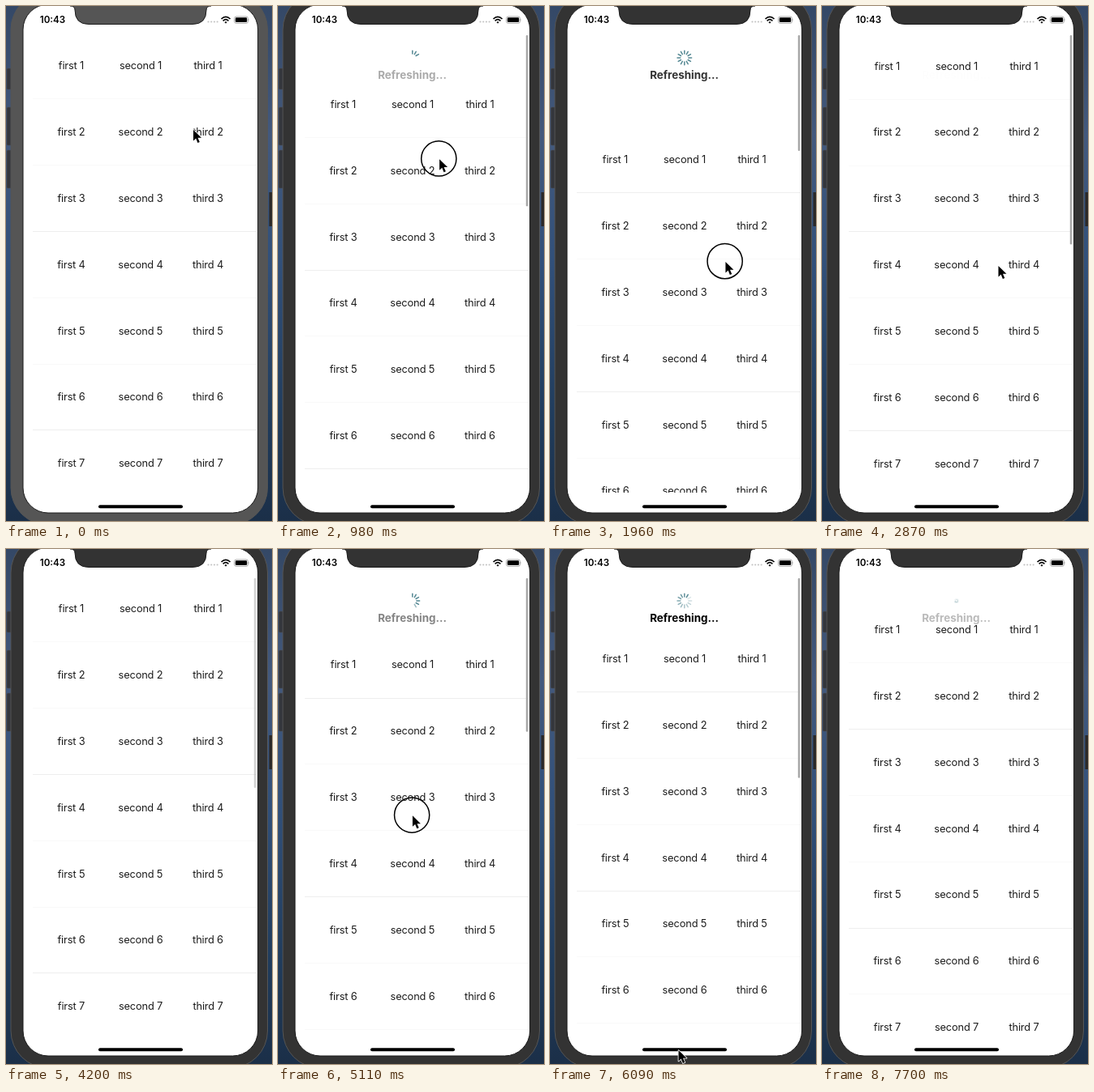
These frames come from a looping animation (328 by 636 pixels, 7770 ms). An HTML page:

```html
<!DOCTYPE html>
<html lang="en">
<head>
<meta charset="utf-8">
<title>Pull to refresh</title>
<style>
  html, body { margin: 0; width: 100%; height: 100%; overflow: hidden; background: #24405f; }
  svg { display: block; width: 328px; height: 636px; }
  text { font-family: Inter, "Liberation Sans", sans-serif; text-anchor: middle; }
  .cell { font-size: 12.8px; letter-spacing: -0.15px; fill: #1c1c1c; }
</style>
</head>
<body>
<svg viewBox="0 0 328 636">
  <defs>
    <linearGradient id="sea" x2="0" y2="1">
      <stop offset="0" stop-color="#344866"/>
      <stop offset=".25" stop-color="#43597d"/>
      <stop offset=".5" stop-color="#31507a"/>
      <stop offset=".8" stop-color="#203c5c"/>
      <stop offset="1" stop-color="#1b2f48"/>
    </linearGradient>
    <clipPath id="view"><rect x="21" y="24" width="290" height="577"/></clipPath>
  </defs>
  <rect width="328" height="636" fill="url(#sea)"/>
  <rect x="324.5" y="230" width="4" height="42" fill="#2b2928"/>
  <g fill="#34363c" stroke="#4b4e55" stroke-width=".6">
    <rect x="1" y="77" width="7" height="26" rx="1.5"/>
    <rect x="1" y="125" width="7" height="47" rx="1.5"/>
    <rect x="1" y="178" width="7" height="47" rx="1.5"/>
  </g>
  <rect id="bezel" x="6" y="-17" width="316.5" height="658" rx="46" stroke="#555"/>
  <rect x="21" y="-2" width="289.6" height="628" rx="31" fill="#fff" stroke="#1a1a1a"/>

  <g id="spinner" stroke="#568994" stroke-width="1.5" stroke-linecap="round"></g>
  <text id="label" x="165.5" y="89.5" font-size="13.4" font-weight="700">Refreshing...</text>
  <g clip-path="url(#view)"><g id="list"></g></g>
  <line id="bar" x1="307" x2="307" y1="37.2" stroke="#a9a9a9" stroke-width="2.4" stroke-linecap="round"/>

  <path id="notch" d="M79-3V0Q85 0 85 5Q85 22.5 102 22.5H230Q247 22.5 247 5Q247 0 253 0V-3Z" stroke="#1a1a1a"/>
  <text x="57.5" y="21" font-size="11.6" font-weight="600">10:43</text>
  <g id="signal" fill="#c4c4c4"></g>
  <g fill="none" stroke="#000" stroke-width="1.7">
    <path d="M265.5 16Q271 10.8 276.5 16M267.6 18.3Q271 15.1 274.4 18.3"/>
    <path d="M271 21.3l-1.2-1.3q1.2-1 2.4 0z" fill="#000" stroke-width=".6"/>
  </g>
  <rect x="281.5" y="13" width="17" height="8.4" rx="2.5" fill="none" stroke="#999" stroke-width=".8"/>
  <rect x="282.8" y="14.3" width="14.4" height="5.8" rx="1.4"/>
  <path d="M299.5 15.8q1.3 1.3 0 2.8z" fill="#999"/>
  <rect x="114" y="616.2" width="104" height="4" rx="2"/>

  <g id="pointer">
    <circle id="ring" cx="-.8" cy="-.8" r="21.6" fill="none" stroke="#000" stroke-width="1.5"/>
    <path d="M0 0V13.5L3.2 10.6 5.4 16 7.8 15 5.5 9.8H10Z" stroke="#fff" stroke-width="1.6" stroke-linejoin="round" paint-order="stroke"/>
  </g>
</svg>
<script>
const LOOP = 7770, STEP = 70, PITCH = 81.83, REST = 61.5;
const NS = "http://www.w3.org/2000/svg";
const $ = id => document.getElementById(id);

function add(parent, tag, attrs, text = "") {
  const el = document.createElementNS(NS, tag);
  for (const k in attrs) el.setAttribute(k, attrs[k]);
  el.textContent = text;
  return parent.appendChild(el);
}
const set = (id, name, value) => $(id).setAttribute(name, value);
const clamp = x => Math.max(0, Math.min(1, x));
const mod = (x, n) => ((x % n) + n) % n;
const easeIn = p => p * p;
const easeOut = p => 1 - (1 - p) * (1 - p);

const lines = [];
for (let i = 0; i < 8; i++) {
  const y = 78.2 + i * PITCH;
  ["first", "second", "third"].forEach((word, c) =>
    add($("list"), "text", { class: "cell", x: [80.5, 166, 249][c], y }, `${word} ${i + 1}`));
  if (i) lines.push(add($("list"), "line", { x1: 33, x2: 309, stroke: "#eee" }));
}
const spokes = Array.from({ length: 12 }, (_, i) =>
  add($("spinner"), "line", { y1: -5, y2: -8.8, transform: `rotate(${i * 30})` }));
for (let i = 0; i < 4; i++)
  add($("signal"), "circle", { cx: 249.5 + i * 3.7, cy: 19.5, r: 1.1 });

// Where the hand goes: each key eases in from the one before
const hand = [
  { t: 0, x: 231, y: 153 },
  { t: 560, x: 187, y: 101, ease: easeOut },
  { t: 630, x: 187, y: 101, ease: easeOut },
  { t: 2170, x: 217, y: 320, ease: easeOut },
  { t: 2870, x: 217.5, y: 321, ease: easeIn },
  { t: 3290, x: 222, y: 730, ease: easeIn },
  { t: 4550, x: 178, y: 680, ease: easeIn },
  { t: 4830, x: 164, y: 201, ease: easeOut },
  { t: 4920, x: 164, y: 201, ease: easeOut },
  { t: 5600, x: 168, y: 468, ease: easeOut },
  { t: 6090, x: 158.5, y: 619, ease: easeIn },
  { t: 6370, x: 14, y: 640, ease: easeIn }
];
function handAt(t) {
  const i = hand.findIndex(k => t < k.t);
  if (i < 0) return hand[hand.length - 1];
  const a = hand[i - 1], b = hand[i];
  const p = b.ease((t - a.t) / (b.t - a.t));
  return { x: a.x + (b.x - a.x) * p, y: a.y + (b.y - a.y) * p };
}

const DRAG1 = { from: 560, to: 2310, y: 101 };
const DRAG2 = { from: 4830, to: 5530, y: 201 };
const FULL = 5460, END = 7558;
const pull = (t, d) => (handAt(Math.min(t, d.to)).y - d.y) * 0.54;
const settle = ms => (1 + ms * 0.0137) * Math.exp(-ms * 0.0137);

function offsetAt(t) {
  if (t < DRAG1.from) return 0;
  if (t <= DRAG1.to) return pull(t, DRAG1);
  if (t < DRAG2.from) return pull(t, DRAG1) * settle(t - DRAG1.to);
  if (t <= DRAG2.to) return pull(t, DRAG2);
  if (t < END) return REST + (pull(t, DRAG2) - REST) * settle(t - DRAG2.to);
  return REST * settle(t - END);
}

function draw(t) {
  const off = offsetAt(t);
  const busy = t >= FULL, ending = t >= END;
  const close = clamp((off - 13) / (REST - 13));
  const held = [DRAG1, DRAG2].some(d => t >= d.from && t <= d.to);

  const frame = t < DRAG1.from ? "#555" : "#333";
  set("bezel", "fill", frame);
  set("notch", "fill", frame);

  // Hairlines shimmer: every third one is crisp, which one depends on the scroll
  set("list", "transform", `translate(0 ${off.toFixed(2)})`);
  const crisp = Math.round(off / 16);
  lines.forEach((line, i) => {
    const y = Math.round(32.5 + (i + 1) * PITCH + off) + 0.5 - off;
    line.setAttribute("y1", y);
    line.setAttribute("y2", y);
    line.setAttribute("opacity", mod(i + 1 - crisp, 3) ? 0.35 : 1);
  });

  set("label", "opacity", ending ? close : busy ? 1 : clamp(off / 145));
  const count = 12 * (Math.max(0, off) / 110) ** 1.65;
  const lead = Math.floor(t / 83);
  spokes.forEach((s, i) =>
    s.setAttribute("opacity", busy ? 1 - mod(lead - i, 12) / 14 : clamp(count - i)));
  set("spinner", "transform", `translate(165.8 64) scale(${ending ? close : 1})`);

  // The scroll bar fades a moment after the list comes to rest
  const since = t < DRAG2.from ? t - DRAG1.from : t - DRAG2.from;
  const gone = t < DRAG2.from ? 4270 : 7000;
  set("bar", "y2", 34.8 + (busy ? 247 - off + REST : 259 - off));
  set("bar", "opacity", since < 0 ? 0 : clamp((gone - t) / 140));

  const { x, y } = handAt(t);
  set("pointer", "transform", `translate(${x} ${y})`);
  set("ring", "opacity", held ? 1 : 0);
}

const start = performance.now();
function tick() {
  const t = (performance.now() - start) % LOOP;
  draw(Math.floor(t / STEP) * STEP);
  requestAnimationFrame(tick);
}
tick();
</script>
</body>
</html>
```
